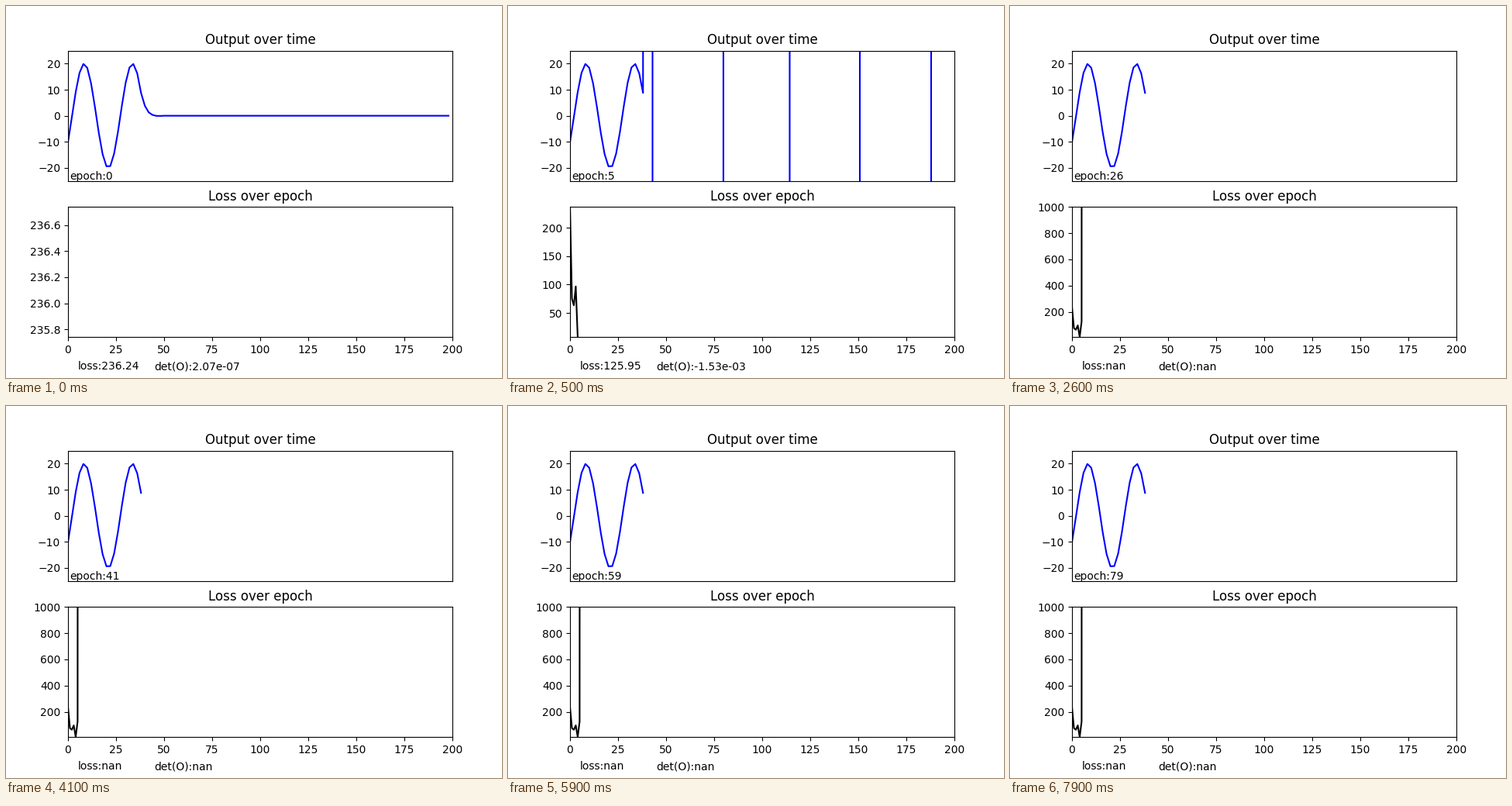
Animation of 640x480 px, one loop 8000 ms. Source, as a matplotlib script:

```python
import numpy as np
import matplotlib.pyplot as plt
from matplotlib.animation import FuncAnimation

EPOCHS = 80
DRIVEN = 20  # samples forced by the teacher signal

t = np.arange(0, 200, 2)
step = np.arange(len(t))
free = step[DRIVEN:] - DRIVEN + 1
teacher = 20 * np.sin(0.5 * step - 0.53)

losses = [236.24, 75.18, 63.42, 96.71, 8.03, 125.95, 48215.37]
dets = [2.07e-07, 3.46e-06, -2.81e-05, 1.94e-04, -6.12e-04, -1.53e-03, -4.18e-01]


def decay():
    y = np.zeros(len(free))
    y[:5] = 3.8, 1.3, 0.3, -0.05, -0.07
    return y


def ringing(rate, freq):
    return 20 * np.exp(rate * free) * np.sin(8.97 + freq * free)


def diverging():
    """Triangle wave far beyond the axis limits, set by its zero crossings."""
    zeros = np.array([42.94, 79.8, 114.3, 150.8, 187.9])
    x = t[DRIVEN:]
    near = np.abs(x[:, None] - zeros).argmin(axis=1)
    return 1e5 * (-1.0) ** near * (zeros[near] - x)


free_runs = [
    decay(),
    ringing(-0.06, 0.42),
    ringing(-0.03, 0.46),
    ringing(-0.015, 0.53),
    ringing(-0.002, 0.50),
    diverging(),
    1e5 * free,
]


def output(epoch):
    y = teacher.copy()
    y[DRIVEN:] = free_runs[epoch] if epoch < len(free_runs) else np.nan
    return y


fig, (top, bottom) = plt.subplots(2, 1, figsize=(6.4, 4.8), dpi=100)

top.set(title="Output over time", xlim=(0, 200), ylim=(-25, 25), xticks=[])
top.set_yticks(range(-20, 21, 10))
bottom.set(title="Loss over epoch", xlim=(0, 200))

out_line, = top.plot([], [], color="b", lw=1.5)
loss_line, = bottom.plot([], [], color="k", lw=1.5)
epoch_text = top.text(0.005, 0.01, "", transform=top.transAxes)
loss_text = bottom.text(0.025, -0.25, "", transform=bottom.transAxes)
det_text = bottom.text(0.225, -0.25, "", transform=bottom.transAxes)


def update(epoch):
    out_line.set_data(t, output(epoch))

    # The curve trails the text by one epoch
    past = losses[:epoch]
    loss_line.set_data(range(len(past)), past)
    seen = losses[:epoch + 1]
    bottom.set_ylim(min(seen) - 0.5, min(max(seen) + 0.5, 1000))

    known = epoch < len(losses)
    loss = losses[epoch] if known else np.nan
    det = dets[epoch] if known else np.nan
    epoch_text.set_text(f"epoch:{epoch}")
    loss_text.set_text(f"loss:{loss:.2f}")
    det_text.set_text(f"det(O):{det:.2e}")
    return out_line, loss_line, epoch_text, loss_text, det_text


anim = FuncAnimation(fig, update, frames=EPOCHS, interval=100,
                     repeat=True, repeat_delay=0)
plt.show()
```
